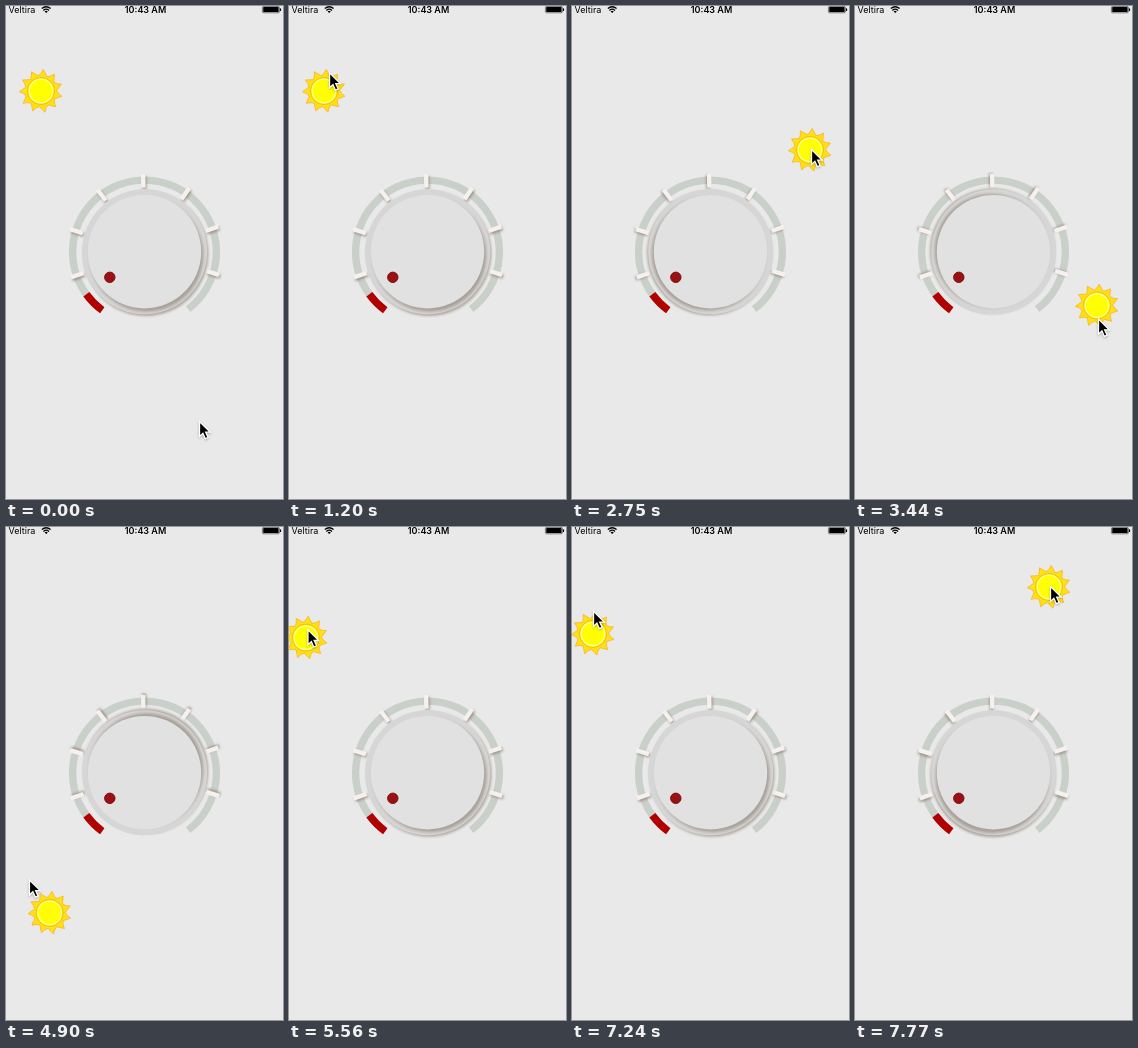
An HTML page for the animation above (8 s loop, 277 by 493 pixels).

```html
<!DOCTYPE html>
<html lang="en">
<head>
<meta charset="utf-8">
<title>Light dial</title>
<style>
html, body { margin: 0; width: 100%; height: 100%; overflow: hidden; background: #e9e9e9; }
svg { display: block; width: 277px; height: 493px; }
text { font: 9px Inter, Roboto, sans-serif; }
.time { font-weight: 600; text-anchor: middle; }
#cursor { filter: drop-shadow(0 1px 1px #0004); }
</style>
</head>
<body>
<svg viewBox="0 0 277 493">
  <defs id="defs"></defs>

  <text x="2.5" y="7">Veltira</text>
  <text class="time" x="139.5" y="7">10:43 AM</text>
  <g fill="none" stroke="#000" stroke-width="1.3">
    <path d="M35.8 2.6Q40.2 -1.2 44.6 2.6M37.4 4.4Q40.2 2 43 4.4"/>
    <path d="M38.6 5.4Q40.2 4.2 41.8 5.4L40.2 7Z" fill="#000" stroke="none"/>
  </g>
  <rect x="256.4" y=".4" width="17" height="6.4" rx="1.3" fill="none" stroke="#000" stroke-width=".5"/>
  <rect x="257.2" y="1.1" width="15.4" height="5" rx=".7"/>
  <rect x="274" y="2.3" width="1.1" height="2.6" rx=".5"/>

  <g id="track" fill="none" stroke-width="7.4"></g>
  <g id="ticks" fill="#f6f1ef" filter="url(#thin)"></g>
  <circle cx="138.7" cy="245.7" r="62.5" fill="#d6d6d6" filter="url(#edge)"/>
  <circle cx="138.5" cy="245.7" r="56.7" fill="#e1e1e1" filter="url(#soft)"/>
  <circle cx="103.8" cy="271.3" r="5.2" fill="#9a1014" stroke="#7d1013"/>

  <g id="sun">
    <path id="rays" fill="#ffdf18" stroke="#f9b51c" stroke-width=".8" stroke-linejoin="round"/>
    <circle r="13.6" fill="#ffe800" stroke="#efb90a" stroke-width=".8"/>
    <circle r="11.8" fill="#ff0" stroke="#ffffa8" stroke-width="1.3"/>
  </g>
  <path id="cursor" d="M0 0V15L3.4 11.8L5.8 17.2L8.6 16L6.2 10.7H10.8Z" stroke="#fff" stroke-width="1.3"/>
</svg>
<script>
const LOOP = 8000, LAG = 40, GRAB = 1620, CX = 138.5, CY = 246;
const $ = id => document.getElementById(id);
const polar = (r, deg, x = 0, y = 0) => {
  const a = deg * Math.PI / 180;
  return [x + r * Math.sin(a), y - r * Math.cos(a)].map(v => v.toFixed(2)).join(' ');
};

// Shadows fall away from the sun, longer with distance (k)
const shadow = (id, k, blur, opacity) => `
  <filter id="${id}" filterUnits="userSpaceOnUse" x="0" y="0" width="277" height="493" color-interpolation-filters="sRGB">
    <feDropShadow data-k="${k}" stdDeviation="${blur}" flood-color="#7a6a58" flood-opacity="${opacity}"/>
  </filter>`;
$('defs').innerHTML = shadow('soft', .02, 1.6, .5) + shadow('edge', .011, 1, .5) + shadow('thin', .011, 1, .55);
const shades = document.querySelectorAll('feDropShadow');

const arc = (from, to, color) => `<path stroke="${color}" d="M${polar(71.9, from, CX, CY)}A71.9 71.9 0 ${+(to - from > 180)} 1 ${polar(71.9, to, CX, CY)}"/>`;
$('track').innerHTML = arc(-144, 142.6, '#c9cfc9') + arc(-144, -126, '#b00000');

for (let i = -3; i <= 3; i++)
  $('ticks').innerHTML += `<rect x="136.3" y="168" width="4.4" height="13.5" transform="rotate(${i * 36 - 1} ${CX} ${CY})"/>`;

// Rays with bent tips
const RAYS = 11, STEP = 360 / RAYS;
let rays = '';
for (let i = 0; i < RAYS; i++) {
  const a = i * STEP + 6;
  rays += `${i ? 'L' : 'M'}${polar(15.5, a - STEP / 2)}Q${polar(17.5, a - 4)} ${polar(21.6, a)}Q${polar(18.5, a + 7)} ${polar(15.5, a + STEP / 2)}`;
}
$('rays').setAttribute('d', rays + 'Z');

// Hand path: time, x, y; a time alone means rest until then
const keys = [
  [600, 192, 416], [1100, 50, 46], [1290, 35, 85],
  [GRAB], [2100, 157, 65], [2720, 238, 144],
  [2960], [3420, 242, 306], [3520, 242, 336],
  [3790], [4150, 160, 406], [4470, 66, 393],
  [4760], [4860, 44, 386], [4900, 22, 354], [5250, 13, 195], [5640, 18, 97],
  [5880], [6330, 75, 115], [6370, 95, 113], [6730, 206, 78], [7000, 110, 118],
  [7200, 21, 107], [7240, 20, 85], [7450, 82, 67], [7730, 194, 60]
];
keys.forEach((key, i) => { if (key.length === 1) key.push(...keys[i - 1].slice(1)); });

// Harmonic mean of the neighbouring speeds: no overshoot, and zero at rests
function slope(i, n) {
  const [a, b, c] = keys.slice(Math.max(i - 1, 0), i + 2);
  if (!c) return 0;
  const l = (b[n] - a[n]) / (b[0] - a[0]), r = (c[n] - b[n]) / (c[0] - b[0]);
  return l * r <= 0 ? 0 : 2 * l * r / (l + r);
}

function handAt(t) {
  const last = keys.length - 1;
  t = Math.min(Math.max(t, keys[0][0]), keys[last][0]);
  let i = 0;
  while (i < last - 1 && t > keys[i + 1][0]) i++;
  const a = keys[i], b = keys[i + 1], d = b[0] - a[0], u = (t - a[0]) / d, v = 1 - u;
  const sa = n => i ? slope(i, n) : 0;
  return [1, 2].map(n => a[n] * (1 + 2 * u) * v * v + b[n] * u * u * (3 - 2 * u)
    + d * u * v * (sa(n) * v - slope(i + 1, n) * u));
}

const place = (el, x, y) => el.setAttribute('transform', `translate(${x.toFixed(2)} ${y.toFixed(2)})`);

function draw(t) {
  const [hx, hy] = handAt(t), [x, y] = handAt(Math.max(t - LAG, GRAB));
  place($('cursor'), hx + 1.5, hy - .5);
  place($('sun'), x, y);
  for (const s of shades) {
    s.setAttribute('dx', (CX - x) * s.dataset.k);
    s.setAttribute('dy', (CY - y) * s.dataset.k);
  }
}

const start = performance.now();
function tick() {
  draw((performance.now() - start) % LOOP);
  requestAnimationFrame(tick);
}
tick();
</script>
</body>
</html>
```
